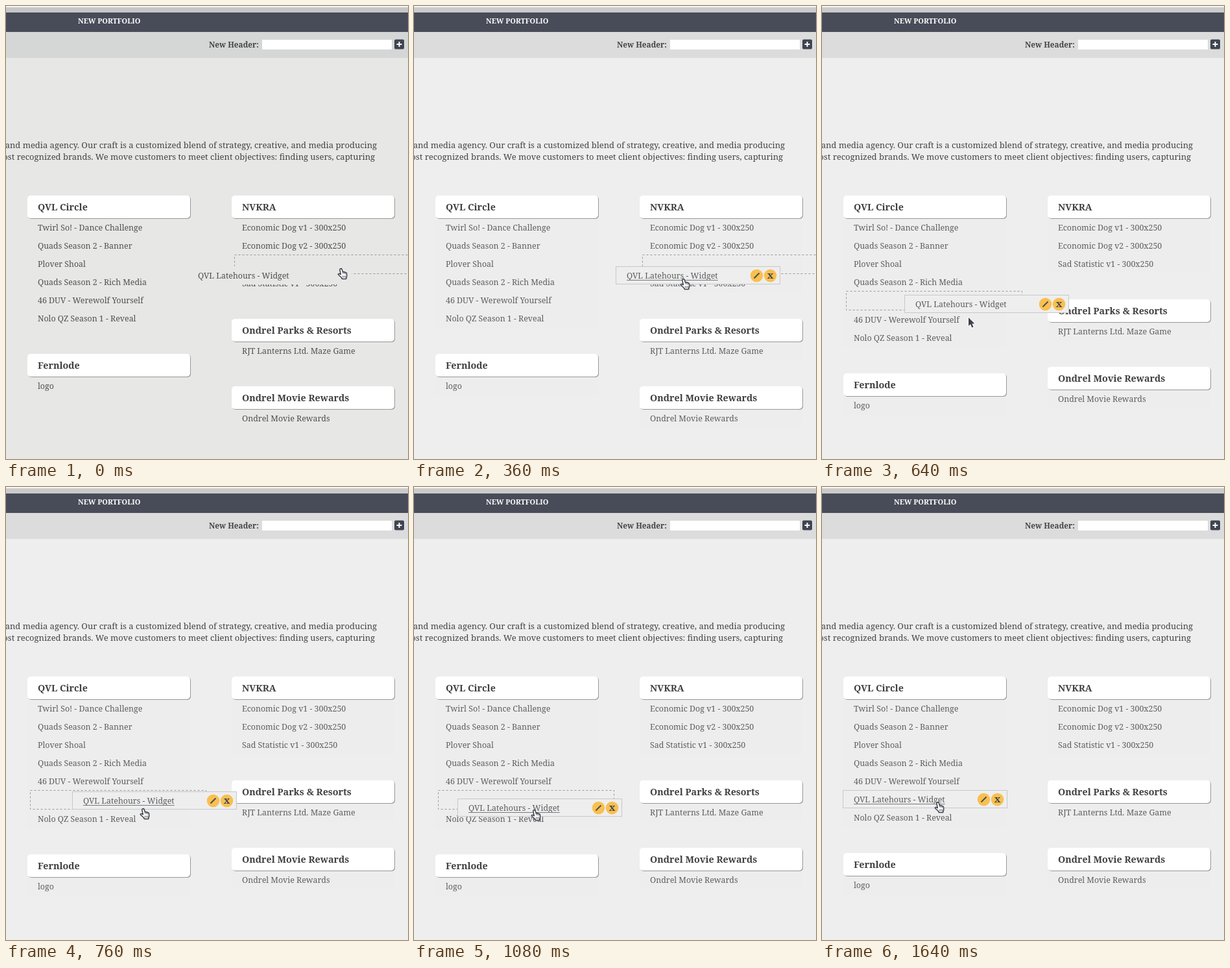
An HTML page with a canvas for the animation above (1680 ms loop, 620x698 px).

```html
<!DOCTYPE html>
<html lang="en">
<head>
<meta charset="utf-8">
<title>Portfolio list sorting</title>
<style>
  html, body { margin: 0; width: 100%; height: 100%; overflow: hidden; background: #eee; }
  canvas { display: block; }
</style>
</head>
<body>
<canvas id="stage" width="620" height="698"></canvas>
<script>
const ctx = document.getElementById('stage').getContext('2d');
const LOOP = 1680, STEP = 40, DROP = 1480;
const DRAGGED = 'QVL Latehours - Widget';

const columns = [
  { x: 33, sections: [
    ['QVL Circle', 'Twirl So! - Dance Challenge', 'Quads Season 2 - Banner', 'Plover Shoal',
      'Quads Season 2 - Rich Media', '46 DUV - Werewolf Yourself', 'Nolo QZ Season 1 - Reveal'],
    ['Fernlode', 'logo'] ] },
  { x: 348, sections: [
    ['NVKRA', 'Economic Dog v1 - 300x250', 'Economic Dog v2 - 300x250', 'Sad Statistic v1 - 300x250'],
    ['Ondrel Parks & Resorts', 'RJT Lanterns Ltd. Maze Game'],
    ['Ondrel Movie Rewards', 'Ondrel Movie Rewards'] ] }
];

// time, item x, item y, cursor x, cursor y
const keys = [
  [0, 279, 401, 519, 412],
  [120, 405, 385, 525, 411],
  [360, 311, 401, 418, 428],
  [640, 127, 445, 230, 488],
  [920, 82, 490, 201, 514],
  [1280, 57, 466, 178, 492],
  [1640, 57, 466, 181, 493]
];

const hand = new Path2D('M4 1.5Q5.5 .5 6.5 2L8 6.5Q9.5 5.5 10 6.8Q11.5 6 12 7.3Q14 6.8 14 9L14.2 12.5L13 17H7L5.5 14.5L1 10.5Q.5 8.5 2.8 9L4.8 10.2L3.3 3Q3.2 2 4 1.5Z');
const knuckles = new Path2D('M8 6.5V9M10 7V9.5M12 7.5V10M8 12V15M10 12V15M12 12V15');
const arrow = new Path2D('M0 0V13L3 10.3L5.2 15.5L7.5 14.5L5.3 9.5H9.5Z');

function slope(i, c) {
  if (!i || i === keys.length - 1) return 0;
  const rate = k => (keys[k + 1][c] - keys[k][c]) / (keys[k + 1][0] - keys[k][0]);
  const a = rate(i - 1), b = rate(i);
  return a * b > 0 ? 2 * a * b / (a + b) : 0;
}

// Monotone cubic interpolation through the keys
function track(t, c) {
  let i = 0;
  while (i < keys.length - 2 && t >= keys[i + 1][0]) i++;
  const [p, q] = [keys[i], keys[i + 1]], d = q[0] - p[0], u = Math.min(1, (t - p[0]) / d);
  const s = u * u * (3 - 2 * u);
  return p[c] + (q[c] - p[c]) * s
    + d * u * (1 - u) * (slope(i, c) * (1 - u) - slope(i + 1, c) * u);
}

function rect(x, y, w, h, color, radius = 0) {
  ctx.fillStyle = color;
  ctx.beginPath();
  ctx.roundRect(x, y, w, h, radius);
  ctx.fill();
}

function text(str, x, y, size, color, weight = 'normal', align = 'left') {
  ctx.font = `${weight} ${size}px "Noto Serif", serif`;
  ctx.textAlign = align;
  ctx.fillStyle = color;
  ctx.fillText(str, x, y);
}

function line(x1, y1, x2, y2, color, width) {
  ctx.strokeStyle = color;
  ctx.lineWidth = width;
  ctx.beginPath();
  ctx.moveTo(x1, y1);
  ctx.lineTo(x2, y2);
  ctx.stroke();
}

function drawPage(theme) {
  rect(0, 0, 620, 698, theme.page);
  rect(0, 0, 620, 2, '#f6f6f6');
  rect(0, 2, 620, 8, theme.strip);
  rect(0, 10, 620, 30, '#484c58');
  rect(0, 40, 620, 40, theme.bar);
  text('NEW PORTFOLIO', 111, 27, 11, '#fff', 'bold');
  text('New Header:', 313, 64, 11.8, '#444', 'bold');
  rect(395, 52, 200, 15, '#fff');
  rect(599, 51.5, 15, 15, '#3f4451', 2);
  line(602.5, 59, 610.5, 59, '#fff', 2);
  line(606.5, 55, 606.5, 63, '#fff', 2);
  text('and media agency. Our craft is a customized blend of strategy, creative, and media producing',
    572, 219, 12.97, '#444', 'normal', 'right');
  text('most recognized brands. We move customers to meet client objectives: finding users, capturing',
    569, 237, 12.97, '#444', 'normal', 'right');
}

function drawColumn({ x, sections }, slot, dropped, theme) {
  let y = 292;
  sections.forEach(([title, ...items], s) => {
    const gap = s ? -1 : slot;
    if (!s && dropped) items.splice(5, 0, '');
    const height = items.length * 28 + (gap >= 0 ? 30 : 0);
    rect(x, y + 30, 251, height + 6, theme.list);
    rect(x + 1, y + 1, 251, 35, '#989898', 5);
    rect(x, y, 251, 35, '#fff', 5);
    text(title, x + 16, y + 23, 14.3, '#404040', 600);
    items.forEach((item, i) => {
      const shift = gap >= 0 && i >= gap ? 30 : 0;
      text(item, x + 16, y + 54 + i * 28 + shift, 12.4, theme.item);
    });
    if (gap >= 0) {
      ctx.strokeStyle = '#999';
      ctx.lineWidth = 1;
      ctx.setLineDash([3, 3]);
      ctx.strokeRect(x + 4.5, y + 35.5 + gap * 28, 271, 29);
      ctx.setLineDash([]);
    }
    y += 76 + height;
  });
}

function drawButton(x, y) {
  rect(x - 9.75, y - 9.75, 19.5, 19.5, '#f9c04f', 9.75);
}

function drawItem(x, y, hover, over, theme) {
  rect(x, y, 254, 28, theme.page);
  text(DRAGGED, x + 17, y + 19, 12.4, theme.item);
  if (!hover) return;
  if (over) {
    const width = ctx.measureText(DRAGGED).width;
    line(x + 17, y + 21.5, x + 17 + width, y + 21.5, '#737985', 1);
  }
  ctx.strokeStyle = '#c8c8c8';
  ctx.lineWidth = 1;
  ctx.strokeRect(x + .5, y + .5, 253, 27);
  const pencil = x + 217.5, remove = x + 238.5, middle = y + 14.5;
  drawButton(pencil, middle);
  line(pencil - 4, middle + 4, pencil + 4, middle - 4, '#484c58', 2);
  drawButton(remove, middle);
  text('x', remove, middle + 4.5, 15, '#3f4451', 'bold', 'center');
}

function drawCursor(x, y, pointing) {
  ctx.save();
  ctx.lineJoin = 'round';
  if (pointing) {
    ctx.translate(x - 7.5, y - 8.5);
    ctx.fillStyle = '#fff';
    ctx.strokeStyle = '#3c404a';
    ctx.lineWidth = 1.5;
    ctx.fill(hand);
    ctx.stroke(hand);
    ctx.lineWidth = .8;
    ctx.stroke(knuckles);
  } else {
    ctx.translate(x - 4, y - 8);
    ctx.strokeStyle = '#fff';
    ctx.lineWidth = 2;
    ctx.stroke(arrow);
    ctx.fillStyle = '#3c404a';
    ctx.fill(arrow);
  }
  ctx.restore();
}

function draw(t) {
  const first = t < STEP, dropped = t >= DROP;
  const theme = first
    ? { page: '#e7e7e6', list: '#e7e7e6', bar: '#d5d7d6', strip: '#c6c6c6', item: '#505050' }
    : { page: '#eee', list: '#ededed', bar: '#dcdcdc', strip: '#cbcbcb', item: '#5e5e5e' };
  const x = dropped ? 32 : Math.round(track(t, 1));
  const y = dropped ? 467 : Math.round(track(t, 2));
  const cx = Math.round(track(t, 3)), cy = Math.round(track(t, 4));
  const over = cy - 8 < y + 28;
  const leftSlot = t < 560 || dropped ? -1 : t < 720 ? 4 : 5;

  drawPage(theme);
  drawColumn(columns[0], leftSlot, dropped, theme);
  drawColumn(columns[1], t < 560 ? 2 : -1, false, theme);
  drawItem(x, y, !first, over, theme);
  drawCursor(cx, cy, over);
}

const start = performance.now();
function tick() {
  const t = (performance.now() - start) % LOOP;
  draw(Math.floor(t / STEP) * STEP);
  requestAnimationFrame(tick);
}
tick();
</script>
</body>
</html>
```
